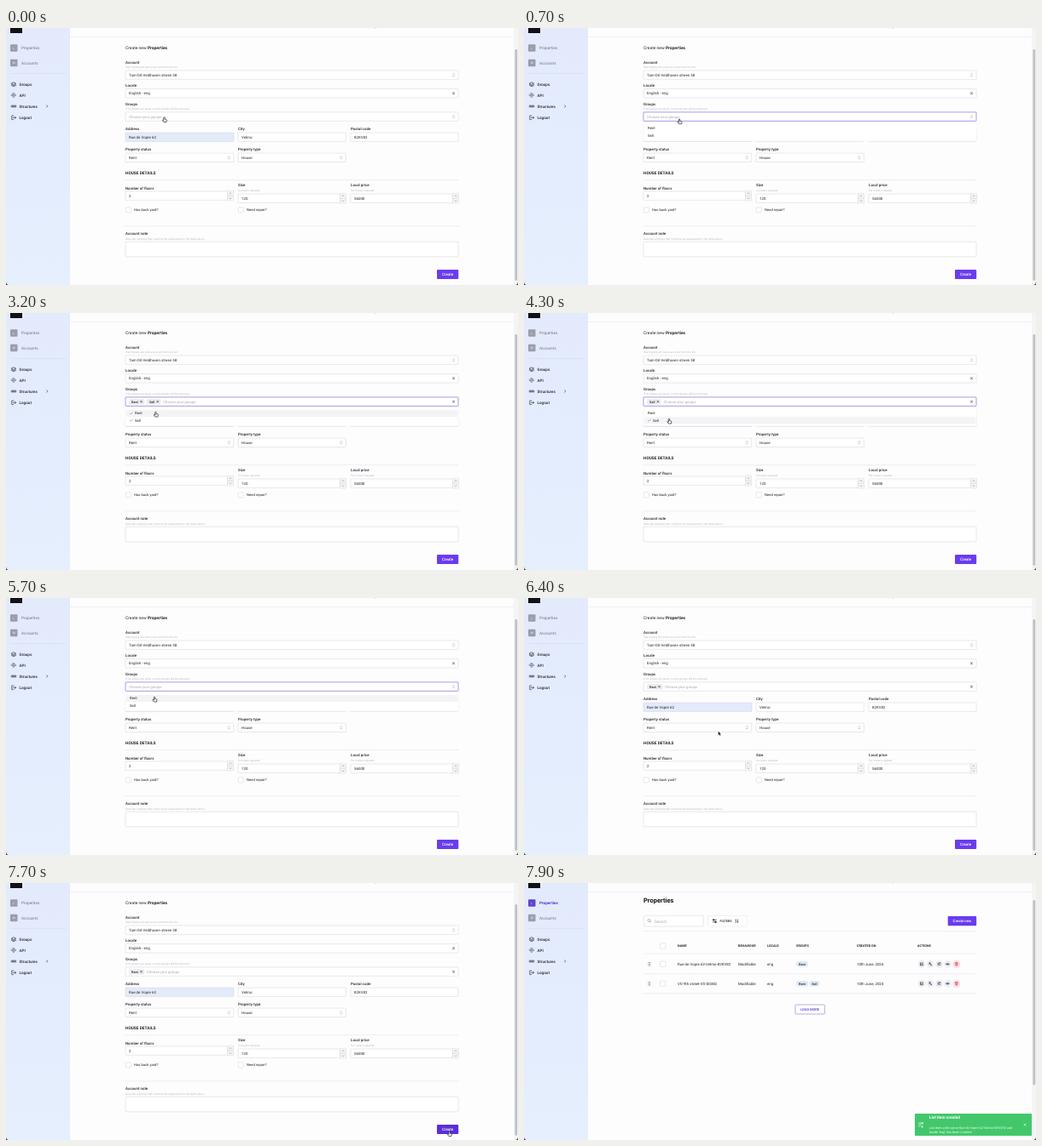
An HTML page that plays this animation: 600 by 302 pixels, repeating every 8 s.

```html
<!DOCTYPE html>
<html lang="en">
<head>
<meta charset="utf-8">
<title>Create property</title>
<style>
  html, body { margin: 0; width: 100%; height: 100%; overflow: hidden; background: #fdfdfe; }
  svg { display: block; width: 100vw; height: 100vh; }
  text { font-family: Roboto, sans-serif; text-rendering: geometricPrecision; white-space: pre; }
</style>
</head>
<body>
<svg id="stage" viewBox="0 0 600 302"></svg>
<script>
const LOOP = 8000, STEP = 100;
const INK = '#25262c', GREY = '#a6a7ad', BORDER = '#cfd0d5', PURPLE = '#6a3cf0';
const STREET = 'Rue de Vopre 62', CITY = 'Velmo', POSTCODE = '82KV82';
const ADDRESS = `${STREET}-${CITY}-${POSTCODE}`;

// Drawing helpers; text is placed by its vertical centre.
const text = (x, y, s, size = 4.4, fill = INK, weight = 400, anchor = 'start') =>
  `<text x="${x}" y="${y + size * .35}" font-size="${size}" fill="${fill}" font-weight="${weight}" text-anchor="${anchor}">${s}</text>`;
const box = (x, y, w, h, fill = '#fff', stroke = BORDER, r = .6, sw = .5) =>
  `<rect x="${x}" y="${y}" width="${w}" height="${h}" rx="${r}" fill="${fill}" stroke="${stroke}" stroke-width="${sw}"/>`;
const path = (d, stroke = INK, w = .6, fill = 'none') =>
  `<path d="${d}" stroke="${stroke}" stroke-width="${w}" fill="${fill}" stroke-linecap="round" stroke-linejoin="round"/>`;
const rule = (y, x1 = 140, x2 = 530) => path(`M${x1} ${y}H${x2}`, '#e0e1e6', .5);
const at = (x, y, content) => `<g transform="translate(${x} ${y})">${content}</g>`;
const group = (id, content) => `<g id="${id}">${content}</g>`;

const label = (x, y, s) => text(x, y, s, 4.4, INK, 500);
const hint = (x, y, s) => text(x, y, s, 3.2, '#9b9ca3', 300);
const cross = (x, y, r = 1.1, color = INK) => path(`M${x - r} ${y - r}l${2 * r} ${2 * r}m0 ${-2 * r}l${-2 * r} ${2 * r}`, color, .6);
const upDown = (x, y) => path(`M${x - 1} ${y - .8}l1 -1l1 1M${x - 1} ${y + .8}l1 1l1 -1`, '#777', .45);
const field = (x, y, w, value, fill) => box(x, y, w, 10.4, fill) + text(x + 4, y + 5.3, value);
const select = (x, y, w, value) => field(x, y, w, value) + upDown(x + w - 5.5, y + 5.2);
const check = (x, y) => path(`M${x - 1.4} ${y}l1 1l2 -2.1`, '#666', .5);

function numberField(x, y, value) {
  const stepper = (sy, dir) => box(x + 119.5, sy, 7, 5.6, '#f6f6f9', BORDER, .4, .4) +
    path(`M${x + 122} ${sy + 2.8 + dir * .5}l1 ${-dir}l1 ${dir}`, '#555', .45);
  return field(x, y, 119.5, value) + stepper(y - .7, 1) + stepper(y + 5.5, -1);
}

const icons = {
  layers: path('M-2.5 -1L0 -2.3L2.5 -1L0 .3ZM-2.5 .3L0 1.6L2.5 .3M-2.5 1.5L0 2.8L2.5 1.5', INK, .6),
  api: path('M0 -2.7l1 1l-1 1l-1 -1ZM0 .7l1 1l-1 1l-1 -1ZM-1.7 -1l1 1l-1 1l-1 -1ZM1.7 -1l1 1l-1 1l-1 -1Z', INK, .5),
  boxes: [-2, 0, 2].map(x => box(x - .7, -1.1, 1.4, 2.2, 'none', INK, .3, .6)).join(''),
  logout: path('M-.3 -2.3H-2.3V2.3H-.3M-1 0H2.6M1.3 -1.3L2.6 0L1.3 1.3', INK, .6),
  edit: path('M0 -1.4H-1.5V1.5H1.4V0M-.4 .4L1.6 -1.6', INK, .65),
  translate: path('M-1.5 -1.2H.3M-.6 -1.8V-1.2Q-.6 .2 -1.5 .5M-.2 0L1.5 1.6M.7 .2V1.5', INK, .6),
  shuffle: path('M-1.5 -1.2H0M-1.5 1.4L1.5 -1.5M.5 -1.5H1.5V-.5M.2 1.3H1.5M-1.5 .1H-.6', INK, .55),
  eye: path('M-1.9 0Q0 -2.3 1.9 0Q0 2.3 -1.9 0Z', INK, .55) + `<circle r=".65" fill="${INK}"/>`,
  trash: path('M-1.4 -1.2H1.4M-.5 -1.7H.5M-1.1 -1.2L-.9 1.7H.9L1.1 -1.2M0 -.4V1', '#d9364a', .6),
};

function sidebar() {
  const links = [['Groups', 'layers', 66], ['API', 'api', 79], ['Structures', 'boxes', 92], ['Logout', 'logout', 105.3]];
  return '<rect width="75" height="302" fill="url(#side)"/><rect x="5" width="14" height="6" fill="#111116"/>' +
    '<rect id="badge" x="5" y="19.2" width="8.5" height="8.5" rx="1"/>' + text(9.2, 23.5, 'L', 3.3, '#fff', 400, 'middle') +
    '<rect x="5" y="36.8" width="8.5" height="8.5" rx="1" fill="#9b9dab"/>' + text(9.2, 41, 'M', 3.3, '#fff', 400, 'middle') +
    `<text id="navLabel" x="18" y="25.1" font-size="4.65">Properties</text>` + text(18, 41, 'Accounts', 4.65, '#70727e') +
    path('M6 53.6H70', '#d2d8e8', .5) +
    links.map(([name, icon, y]) => at(9, y, icons[icon]) + text(15.5, y, name, 4.6, INK, 500)).join('') +
    path('M47.6 90.8l1.2 1.2l-1.2 1.2', INK, .6);
}

function form() {
  return text(140, 23.3, 'Create new <tspan font-weight="700">Properties</tspan>', 4.95) +
    label(140, 40, 'Account') + hint(140, 45.7, 'Start typing and pick a account from the list.') +
    select(140, 50, 390, 'Tam-Orl-Veldhaven streen 58') +
    label(140, 67.2, 'Locale') + field(140, 71.6, 390, 'English - eng') + cross(524.5, 76.8) +
    label(140, 89, 'Groups') + hint(140, 95, 'If no groups are given, current groups will be removed.') +
    group('groupsField', '') +
    label(140, 118.8, 'Address') + field(140, 123, 127, STREET, '#e3ebfb') +
    label(272, 118.8, 'City') + field(272, 123, 126.3, CITY) +
    label(404, 118.8, 'Postal code') + field(404, 123, 126, POSTCODE) +
    label(140, 142.8, 'Property status') + select(140, 147.1, 126.7, 'Rent') +
    label(272, 142.8, 'Property type') + select(272, 147.1, 126.3, 'House') +
    text(140, 170.4, 'HOUSE DETAILS', 4.8, INK, 700) + rule(178.6) +
    label(140, 188, 'Number of floors') + numberField(140, 191.9, '2') +
    label(272, 184.8, 'Size') + hint(272, 190.9, 'In meters squared.') + numberField(272, 195, '120') +
    label(404, 184.8, 'Local price') + hint(404, 190.9, 'Per meters squared.') + numberField(404, 195, '56000') +
    box(140.3, 210.8, 6, 6) + text(150, 213.9, 'Has back yard?', 4.2) +
    box(272.2, 210.8, 6, 6) + text(282, 213.9, 'Need repair?', 4.2) +
    rule(232.8) +
    label(140, 241.4, 'Account note') +
    hint(140, 247.4, 'Describe anything that could not be represented in the fields above.') +
    box(140, 251.2, 390, 17.6) +
    '<rect id="create" x="505" y="284" width="25.2" height="11" rx="1"/>' +
    text(517.6, 289.5, 'Create', 4.5, '#fff', 500, 'middle') + group('menu', '');
}

function list() {
  const columns = [[180, 'NAME'], [251, 'BEHAVIOUR'], [285, 'LOCALE'], [319, 'GROUPS'], [390, 'CREATED ON'], [461, 'ACTIONS']];
  const actions = [[466, 'edit'], [476.2, 'translate'], [486.4, 'shuffle'], [496.6, 'eye'], [506.8, 'trash']];
  const checkbox = y => box(159.6, y - 3.1, 6.2, 6.2);
  const pill = (x, w, s) => `<rect x="${x}" y="-3.3" width="${w}" height="6.6" rx="3" fill="#dce8f4"/>` +
    text(x + w / 2, 0, s, 3.8, INK, 500, 'middle');
  const grip = [-1.8, 0, 1.8].map(y => [-.8, .8].map(x => `<circle cx="${146.8 + x}" cy="${y}" r=".5" fill="#555"/>`).join('')).join('');
  const row = (y, name, groups) => at(0, y, grip + checkbox(0) + text(180, 0, name) + text(251, 0, 'Modifiable') +
    text(285, 0, 'eng') + groups + text(390, 0, '10th June, 2024') +
    actions.map(([x, icon]) => at(x, 0, `<circle r="4.5" fill="${icon === 'trash' ? '#fbdde1' : '#eeeff3'}"/>` + icons[icon])).join(''));
  return text(140, 20, 'Properties', 7.5, '#141419', 700) +
    box(140.3, 38.4, 70, 12.6, '#fff', BORDER, 1) + '<circle cx="146.5" cy="44" r="1.5" fill="none" stroke="#777" stroke-width=".5"/>' +
    path('M147.6 45.2l1.3 1.3', '#777', .5) + text(153, 44.9, 'Search', 4.6, GREY) +
    box(215.6, 38.4, 45.4, 12.6, '#fff', '#dfe0e5', 1) + at(223.3, 44.6, path('M-2 -1.2H2M-2 1.2H2', INK, .7) + box(-1.8, -1.9, 1.4, 1.4, INK, INK, .2) + box(.5, .5, 1.4, 1.4, INK, INK, .2)) +
    text(229.5, 44.7, 'FILTERS', 3.8, INK, 500) + path('M247.5 43H249M247.5 44.6H249M247.5 46.2H249M250.5 42.8V46.4M249.8 45.6L250.5 46.4L251.2 45.6', INK, .5) +
    `<rect x="496.7" y="39" width="33.5" height="11.2" rx="1" fill="${PURPLE}"/>` + text(513.4, 44.6, 'Create new', 4.3, '#fff', 500, 'middle') +
    rule(56.6) + checkbox(74) + columns.map(([x, s]) => text(x, 73.5, s, 3.75, INK, 700)).join('') +
    rule(83) + row(95.3, ADDRESS, pill(319, 14, 'Rent')) +
    rule(106.7) + row(118.2, 'VO 9th street-VO-00382', pill(319, 14, 'Rent') + pill(334.5, 11.8, 'Sell')) + rule(129.8) +
    box(318, 143, 34.3, 11, '#fff', '#6a5bbd', 1) + text(335.1, 148.6, 'LOAD MORE', 4, '#5b35cf', 500, 'middle') +
    group('toast', '<rect x="458" y="271" width="137" height="26" rx=".8" fill="#43c76b"/>' +
      at(465, 284, path('M-2.5 -2H.5M-2.5 0H-.8M-2.5 2.5L2.5 -2.4M.8 -2.4H2.5V-.8M.5 2.4H2.5M1.5 1.4V3.2', '#fff', .6)) +
      text(474.8, 275.3, 'List item created', 4.8, '#fff', 700) +
      text(474.8, 287.2, `List item with name ${ADDRESS} and`, 3.9, '#e9fbee') +
      text(474.8, 293, "locale 'eng' has been created.", 3.9, '#e9fbee') + cross(587, 284, 1.1, '#fff'));
}

const stage = document.getElementById('stage');
stage.innerHTML = `<defs><linearGradient id="side" x2="0" y2="1"><stop stop-color="#e2eafc"/><stop offset="1" stop-color="#e6effe"/></linearGradient></defs>
  <rect width="600" height="302" fill="#fdfdfe"/>` + sidebar() + rule(10.4, 75, 595) + path('M431.4 0h2', '#aaa', .5) +
  group('form', form()) + group('list', list()) +
  '<rect x="595" width="5" height="302" fill="#f5f5f6"/><rect id="thumb" x="596.4" width="2.8" rx="1.4" fill="#bfc0c3"/>' +
  path('M0 299.5V302H2.5Q0 302 0 299.5ZM600 299.5V302H597.5Q600 302 600 299.5Z', '#111', .3, '#111') +
  group('cursor',
    group('hand', path('M-.7 -2.5Q0 -3.4 .6 -2.5V-.5L2.4 0Q3 .2 2.9 1L2.4 3H-.6L-2.2 .9Q-2.2 .2 -1.3 .4L-.7 .8Z', '#111', .65, '#fff')) +
    group('arrow', path('M-.6 -2.6V2.4L.6 1.4L1.4 3.1L2.2 2.7L1.4 1.1H3Z', '#fff', .35, '#111')));
const $ = id => document.getElementById(id);
const show = (id, on) => $(id).setAttribute('display', on ? 'inline' : 'none');

const cursorPath = [[0, 185.5, 107.5], [600, 184, 108], [1000, 172, 118.5], [1400, 173, 119], [1800, 182, 123],
  [2200, 168, 127], [2700, 168, 127], [3200, 175.5, 119], [3800, 175, 119], [4300, 170, 127], [4800, 170, 127],
  [5300, 174, 119], [6200, 174, 119], [6800, 383, 273.7], [7500, 519.5, 294.5], [LOOP, 519.5, 294.5]];

function cursorAt(t) {
  const i = cursorPath.findIndex(p => p[0] > t);
  const [t0, x0, y0] = cursorPath[i - 1], [t1, x1, y1] = cursorPath[i];
  const u = (t - t0) / (t1 - t0), e = u * u * (3 - 2 * u);
  return [x0 + (x1 - x0) * e, y0 + (y1 - y0) * e];
}

function groupsField(open, selected) {
  const widths = { Rent: 17.8, Sell: 16.2 };
  let x = 144.3, tags = '';
  for (const name of selected) {
    const w = widths[name];
    tags += `<rect x="${x}" y="101" width="${w}" height="6.5" rx="1" fill="#ececef"/>` +
      text(x + 2.8, 104.3, name, 3.8, INK, 500) + cross(x + w - 3.6, 104.2, .9);
    x += w + 3;
  }
  return box(140, 98.9, 390, 10.4, '#fff', open ? '#7868d8' : BORDER, .6, open ? .65 : .5) + tags +
    text(x, 104.3, 'Choose your groups', 4.3, GREY) + (selected.length ? cross(524.5, 104.2) : upDown(524.5, 104.2));
}

function menu(selected, cursorY) {
  const option = (name, y, hovered) => {
    const on = selected.includes(name);
    return (hovered ? `<rect x="141" y="${y - 4.1}" width="388.5" height="8.2" fill="#f4f4f6"/>` : '') +
      (on ? check(146.7, y) : '') + text(on ? 151 : 145, y, name, 4.3);
  };
  return '<rect x="139.5" y="110.6" width="391" height="22.2" rx=".8" fill="#fff" stroke="#ececf0" stroke-width=".4"/>' +
    option('Rent', 117.9, cursorY > 112 && cursorY < 125) + option('Sell', 126.2, cursorY >= 125);
}

function render(t) {
  const [x, y] = cursorAt(t);
  const listed = t >= 7800, open = t >= 500 && t < 6300;
  const selected = [];
  if (t >= 1400 && t < 3700 || t >= 6000) selected.push('Rent');
  if (t >= 2400 && t < 4700) selected.push('Sell');

  show('form', !listed);
  show('list', listed);
  show('toast', t >= 7900);
  show('cursor', !listed);
  const onButton = x > 505 && y > 284, pointing = y < 135 || onButton;
  show('hand', pointing);
  show('arrow', !pointing);
  $('cursor').setAttribute('transform', `translate(${x} ${y})`);
  $('groupsField').innerHTML = groupsField(open, selected);
  $('menu').innerHTML = open ? menu(selected, y) : '';
  $('create').setAttribute('fill', onButton ? '#5a2fd6' : PURPLE);
  $('badge').setAttribute('fill', listed ? '#6045cf' : '#9b9dab');
  $('navLabel').setAttribute('fill', listed ? '#5138c0' : '#70727e');
  $('navLabel').setAttribute('font-weight', listed ? 700 : 400);
  $('thumb').setAttribute('y', listed ? 20 : 25);
  $('thumb').setAttribute('height', listed ? 217.5 : 272);
}

function tick() {
  render(Math.floor(performance.now() % LOOP / STEP) * STEP);
  requestAnimationFrame(tick);
}
tick();
</script>
</body>
</html>
```
